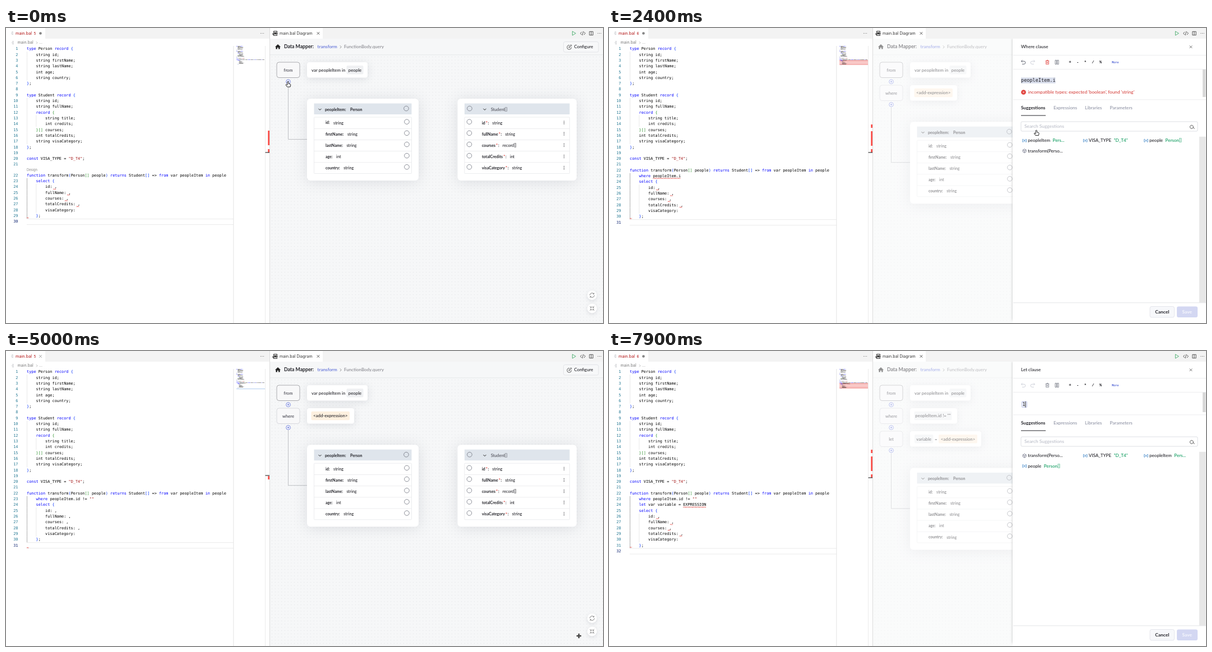
These frames come from a looping animation (1065 px wide and 526 px high, 8 s). An HTML page with a canvas:

```html
<!DOCTYPE html>
<html lang="en">
<head>
<meta charset="utf-8">
<title>Data Mapper</title>
<style>
html, body { margin: 0; width: 100%; height: 100%; overflow: hidden; background: #fff; }
canvas { display: block; width: 1065px; height: 526px; }
</style>
</head>
<body>
<canvas></canvas>
<script>
const W = 1065, H = 526, LOOP = 8000;
const canvas = document.querySelector('canvas'), ctx = canvas.getContext('2d');
const dpr = window.devicePixelRatio || 1;
canvas.width = W * dpr;
canvas.height = H * dpr;

const UI = 'Lato, sans-serif', SYSTEM = 'Inter, sans-serif';
const CODE = '"DejaVu Sans Mono", monospace', SLAB = '"Liberation Mono", monospace';
const INK = '#222228', GREY = '#8d91a3', BLUE = '#5567d5', RED = '#e0413c', LINE = '#e4e5e8';
const CH = 4.139, ROW = 10.31;

const between = (t, a, b) => t >= a && t < b;
const clamp = (v, a = 0, b = 1) => Math.min(b, Math.max(a, v));
const ease = k => k * k * (3 - 2 * k);

// y is the optical centre of the text; returns the right edge
function text(s, x, y, size, color = INK, weight = 500, font = UI, align = 'left') {
  ctx.font = `${weight} ${size}px ${font}`;
  ctx.textAlign = align;
  ctx.fillStyle = color;
  ctx.fillText(s, x, y + size * 0.33);
  return x + ctx.measureText(s).width;
}
function rect(x, y, w, h, fill) {
  ctx.fillStyle = fill;
  ctx.fillRect(x, y, w, h);
}
function box(x, y, w, h, r, fill, stroke, shadow = 0) {
  ctx.save();
  ctx.beginPath();
  ctx.roundRect(x, y, w, h, r);
  if (shadow) {
    ctx.shadowColor = 'rgba(90,92,110,.17)';
    ctx.shadowBlur = shadow * dpr;
    ctx.shadowOffsetY = 2 * dpr;
  }
  if (fill) { ctx.fillStyle = fill; ctx.fill(); }
  ctx.restore();
  if (stroke) { ctx.strokeStyle = stroke; ctx.lineWidth = 0.7; ctx.stroke(); }
}
function circle(x, y, r, stroke, width = 0.8, fill) {
  ctx.beginPath();
  ctx.arc(x, y, r, 0, 7);
  if (fill) { ctx.fillStyle = fill; ctx.fill(); }
  if (stroke) { ctx.strokeStyle = stroke; ctx.lineWidth = width; ctx.stroke(); }
}
function icon(d, x, y, stroke, width = 0.8, fill) {
  const path = new Path2D(d);
  ctx.save();
  ctx.translate(x, y);
  if (fill) { ctx.fillStyle = fill; ctx.fill(path); }
  if (stroke) { ctx.strokeStyle = stroke; ctx.lineWidth = width; ctx.stroke(path); }
  ctx.restore();
}
const CROSS = 'M-2.3 -2.3 L2.3 2.3 M2.3 -2.3 L-2.3 2.3';
const CHEVRON = 'M-2.5 -1.2 L0 1.3 L2.5 -1.2';
const TRASH = 'M-3.2 -2.4 H3.2 M-1 -2.4 V-3.6 H1 V-2.4 M-2.4 -2.4 V3.6 H2.4 V-2.4 M-.8 -.8 V2 M.8 -.8 V2';
const SPLIT = 'M-3.2 -3.2 H3.2 V3.2 H-3.2 Z M0 -3.2 V3.2';
const UNDO = 'M-1.5 -3.8 L-3.6 -1.8 L-1.5 .2 M-3.6 -1.8 H1.2 A2.6 2.6 0 0 1 1.2 3.4 H-2';
const REDO = 'M1.5 -3.8 L3.6 -1.8 L1.5 .2 M3.6 -1.8 H-1.2 A2.6 2.6 0 0 0 -1.2 3.4 H2';
const HAND = 'M-1.1 .2 Q0 -1.2 1.1 .2 V3.3 L4 4 Q5 4.4 4.8 5.6 L4 9 H-1.4 L-4 5.4 Q-3.6 4.2 -2.4 4.8 L-1.1 6 Z';
const MOVE = 'M0 -4.6 L1.8 -2.6 H.7 V-.7 H2.6 V-1.8 L4.6 0 L2.6 1.8 V.7 H.7 V2.6 H1.8 L0 4.6 L-1.8 2.6 H-.7 V.7 H-2.6 V1.8 L-4.6 0 L-2.6 -1.8 V-.7 H-.7 V-2.6 H-1.8 Z';
function dots(x, y, dx, dy, color = INK, r = 0.65) {
  for (let i = -1; i < 2; i++) circle(x + i * dx, y + i * dy, r, null, 0, color);
}

// ---- state -------------------------------------------------------------
const CLICKS = [100, 800, 1900, 2650, 3450, 4600, 5450, 6050, 6650, 7350];
const MOUSE = [
  [0, 503, 96], [350, 503, 96], [750, 552, 103], [1100, 552, 103], [1700, 758, 186], [2350, 758, 186],
  [2650, 814, 142], [2850, 814, 142], [3150, 850, 279], [4200, 850, 279], [4600, 1022, 508], [5050, 1022, 508],
  [5420, 503, 136], [5700, 503, 136], [6000, 545, 154], [6250, 545, 154], [6500, 582, 157], [6600, 582, 157],
  [6680, 615, 157], [6950, 615, 157], [7300, 791, 96], [LOOP, 791, 96]
];
function mouseAt(t) {
  const i = MOUSE.findIndex(p => p[0] > t);
  const [t0, x0, y0] = MOUSE[i - 1], [t1, x1, y1] = MOUSE[i];
  const k = ease((t - t0) / (t1 - t0));
  return [x0 + (x1 - x0) * k, y0 + (y1 - y0) * k];
}
function stateAt(t) {
  const person = 'peopleItem' + '.id'.slice(0, clamp(Math.floor((t - 2200) / 100), 0, 3));
  const isLet = t >= 6250;
  const opened = isLet ? 6950 : 1300;
  return {
    t, isLet, person,
    clauses: isLet ? 2 : t >= 1200 ? 1 : 0,
    whereCode: t < 2100 ? 'EXPRESSION' : t < 4200 ? person : 'peopleItem.id != ""',
    errors: t < 1200 || between(t, 2200, 4200) || between(t, 5300, 6250) || t >= 6450,
    problems: between(t, 1200, 4200) || isLet ? 6 : 5,
    saved: between(t, 4850, 6900),
    menu: between(t, 300, 1100) || between(t, 5650, 6250),
    panel: between(t, 1300, 4800) || t >= 6950 ? ease(clamp((t - opened) / 200)) : 0
  };
}

// ---- code editor -------------------------------------------------------
const TYPES = `type Person record {
    string id;
    string firstName;
    string lastName;
    int age;
    string country;
};

type Student record {
    string id;
    string fullName;
    record {
        string title;
        int credits;
    }[] courses;
    int totalCredits;
    string visaCategory;
};

const VISA_TYPE = "D_T4";

function transform(Person[] people) returns Student[] => from var peopleItem in people`.split('\n');
const SELECT = ['    select {', ...['id: ,', 'fullName: ,', 'courses: ,', 'totalCredits: ,', 'visaCategory:'].map(s => '        ' + s), '    };', ''];
const KEYWORDS = new Set('type record const function returns from in where let select'.split(' '));
const BRACKETS = ['#0431fa', '#319331', '#7b3814'];

function squiggle(x, w, y) {
  ctx.beginPath();
  ctx.moveTo(x, y);
  for (let i = 1; i * 1.2 <= w; i++) ctx.lineTo(x + i * 1.2, y + (i % 2 ? -1.1 : 0));
  ctx.strokeStyle = RED;
  ctx.lineWidth = 0.9;
  ctx.stroke();
}
function drawEditor(s) {
  rect(0, 0, 470, H, '#fff');
  rect(70, 0, 400, 19, '#f3f3f3');
  for (const [x, y] of [[9, 7], [10, 24]]) icon('M1 0 H4 M0 2.2 H4 M1 4.4 H4', x, y, '#9aa0a6', 0.6);
  text('main.bal', 17, 9.5, 7.3, '#b01011', 400, SYSTEM);
  text(s.problems, 49.5, 9.5, 6.6, '#b01011', 400, SYSTEM);
  if (s.saved) icon(CROSS, 61.5, 9.5, '#777', 0.7);
  else circle(61.5, 9.5, 2.3, null, 0, '#858585');
  dots(457, 9.5, 2.6, 0, '#444', 0.5);
  text('main.bal', 20.5, 26, 7.1, '#777', 400, SYSTEM);
  icon('M-1 -2 L1 0 L-1 2', 55, 26.3, '#888', 0.6);
  text('...', 59, 26, 7, '#777', 400, SYSTEM);

  const lines = [...TYPES];
  if (s.clauses > 0) lines.push('    where ' + s.whereCode);
  if (s.clauses > 1) lines.push('    let var variable = EXPRESSION');
  lines.push(...SELECT);
  const lens = s.clauses === 0 ? 9 : 0;
  const lineY = i => 37 + ROW * i + (i > 20 ? lens : 0);
  const last = lines.length - 1, lastY = lineY(last);
  if (lens) text('Design', 37, 253, 5.8, '#888', 400, SYSTEM);

  rect(37, lastY - 5, 369, 0.8, '#e6e6e6');
  rect(37, lastY + 5, 369, 0.8, '#e6e6e6');
  let depth = 0;
  lines.forEach((line, i) => {
    const y = lineY(i), mapY = 32 + i * 1.146;
    text(i + 1, 21.5, y, 6.9, i === last ? '#0b216f' : '#237893', 400, CODE, 'right');
    const indent = line.search(/\S/);
    for (let c = 0; c < indent; c += 4)
      rect(37 + c * CH, y - ROW / 2, 0.7, ROW, c === 0 && i > 21 ? '#8f8f8f' : '#dedede');
    if (s.errors && s.clauses && i > 21 && i < last) rect(411, mapY - 0.2, 51, 0.9, '#f4a9a7');
    for (const m of line.matchAll(/"[^"]*"|\w+|[{}()[\]]|[^\s\w"{}()[\]]+/g)) {
      const token = m[0];
      let color = '#000';
      if (token[0] === '"') color = '#a31515';
      else if (KEYWORDS.has(token)) color = '#0000ff';
      else if ('{(['.includes(token)) color = BRACKETS[depth++];
      else if ('})]'.includes(token)) color = BRACKETS[--depth];
      text(token, 37 + m.index * CH, y, 6.875, color, 400, CODE);
      ctx.globalAlpha = 0.5;
      rect(411 + m.index * 0.58, mapY, token.length * 0.58, 0.8, color);
      ctx.globalAlpha = 1;
    }
    if (!s.errors) return;
    if (line.endsWith(': ,')) squiggle(37 + (line.length - 1.6) * CH, 5, y + 4.8);
    const bad = line.match(/EXPRESSION|peopleItem(\.\w*)?$/);
    if (bad && i > 21) squiggle(37 + bad.index * CH, bad[0].length * CH, y + 4.8);
  });
  squiggle(37, 4.5, s.errors ? lastY - 6 : lastY + 5);
  if (!s.errors) rect(411, 67, 51, 0.9, '#a9c8ee');

  rect(405.5, 32, 0.8, H, '#dcdcdc');
  rect(462, 32, 0.7, H, '#e2e2e2');
  const shift = s.clauses === 2 ? 4 : 0;
  const ruler = (y, h) => rect(467.3, y + shift, 2.7, h, '#fb4b46');
  if (s.errors) {
    if (s.clauses) ruler(172, 6);
    ruler(s.clauses ? 184 : 183, 26);
    ruler(216, 6);
  } else ruler(223, 6);
  rect(462.5, 221.3 + shift, 7.5, 1.3, '#444');
  rect(470, 0, 0.8, H, '#dcdcdc');
}

// ---- diagram -----------------------------------------------------------
const dotGrid = new Path2D();
for (let y = 51; y < 521; y += 5.73)
  for (let x = 474; x < W; x += 5.73) dotGrid.rect(x, y, 1, 1);

function token(s, x, y, w, warm) {
  box(x, y - 8, w, 15.5, 2, warm ? '#fdf0df' : '#f0f1f3');
  text(s, x + w / 2, y, 7.8, INK, 500, UI, 'center');
}
function clause(name, y, width) {
  box(483, y - 14, 41, 27.5, 4, '#f8f8f9', name === 'from' ? '#8c8c90' : '#cbccd2');
  text(name, 503.5, y, 7.6, '#40404b', 500, UI, 'center');
  box(537, y - 14, width, 27.5, 4, '#fff', null, 14);
}
function drawDiagram(s) {
  rect(471, 0, W, 19, '#f3f3f3');
  rect(471, 0, 94, 19, '#fff');
  icon('M-3 -3.8 H3 V-1.4 H-3 Z M-3 1.4 H3 V3.8 H-3 Z M0 -1.4 V1.4 M-4.5 0 H4.5 M-4.5 0 V2.5 H-3', 480.5, 9.5, '#111', 0.9);
  text('main.bal Diagram', 488, 9.5, 7.15, '#333', 400, SYSTEM);
  icon(CROSS, 557, 9.5, '#333', 0.8);
  icon('M-2.6 -3.6 L3.4 0 L-2.6 3.6 Z', 1013, 9.5, '#2fa35a', 0.8);
  icon('M-2 -2.6 L-4.4 0 L-2 2.6 M2 -2.6 L4.4 0 L2 2.6 M.9 -3.6 L-.9 3.6', 1029, 9.5, '#333', 0.8);
  icon(SPLIT, 1044, 9.5, '#333', 0.8);
  dots(1058.5, 9.5, 2.6, 0, '#444', 0.55);

  rect(471, 19, W, H, '#f6f7f8');
  ctx.fillStyle = '#dfe0e3';
  ctx.fill(dotGrid);
  rect(471, 47.5, W, 0.8, '#e2e3e6');
  icon('M-5 .3 L0 -4.5 L5 .3 H3.6 V4 H1 V1.2 H-1 V4 H-3.6 V.3 Z', 485, 33.5, null, 0, '#222');
  text('Data Mapper:', 496, 33.5, 8.7, INK, 700);
  text('transform', 555.5, 33.5, 8.2, BLUE);
  icon('M-1.2 -2.4 L1.2 0 L-1.2 2.4', 597, 33.8, '#777', 0.8);
  text('FunctionBody.query', 603, 33.5, 8, '#85858c');

  const shift = s.menu ? 6 : 0;
  box(994.5 + shift, 24.5, 62.5, 18.5, 3, '#f7f8f9', '#dcdde1');
  icon('M0 -3.4 A3.8 3.8 0 1 0 3.6 .4 M-1 1 L-.5 -.8 L3 -4.2 L4.2 -3 L.8 .5 Z', 1005 + shift, 34, '#333', 0.8);
  text('Configure', 1013.5 + shift, 33.8, 7.9);
  for (const y of [476.5, 500]) box(1037 + shift, y - 8.5 + shift, 17, 17, 8.5, '#fff', null, 6);
  icon('M-4 0 A4 4 0 0 1 3.2 -2.4 M3.4 -4.2 V-2.2 H1.4 M4 0 A4 4 0 0 1 -3.2 2.4 M-3.4 4.2 V2.2 H-1.4', 1045.5 + shift, 476.5 + shift, '#777', 0.9);
  icon('M-4 -4 L-1.4 -1.4 M-3.6 -1.3 H-1.3 V-3.6 M4 -4 L1.4 -1.4 M3.6 -1.3 H1.3 V-3.6 M-4 4 L-1.4 1.4 M-3.6 1.3 H-1.3 V3.6 M4 4 L1.4 1.4 M3.6 1.3 H1.3 V3.6', 1045.5 + shift, 500 + shift, '#777', 0.8);

  const dy = s.clauses * 41.2;
  icon(`M503.5 ${100 + dy} V${198.5 + dy} H537`, 0, 0, '#b2b3b8', 0.8);
  clause('from', 75, 108);
  text('var peopleItem in', 545, 75, 7.9);
  token('people', 607.5, 75, 30);
  if (s.clauses > 0) {
    const done = s.t >= 5200;
    clause('where', 116, 84);
    token(done ? 'peopleItem.id != ""' : '<add-expression>', 544.5, 115.7, done ? 67 : 68.5, !done);
  }
  if (s.clauses > 1) {
    clause('let', 157, 127);
    token('variable', 545, 157, 33.5);
    text('=', 581, 157, 7.8);
    token('<add-expression>', 588, 157, 69, true);
    if (between(s.t, 6400, 6950)) icon(TRASH, 675, 156.5, RED, 0.8);
  }
  for (let i = 0; i <= s.clauses; i++) {
    circle(503.5, 95.7 + i * 40.8, 3.8, BLUE, 0.8, '#fff');
    icon('M-2 0 H2 M0 -2 V2', 503.5, 95.7 + i * 40.8, BLUE, 0.8);
  }
  ctx.save();
  ctx.translate(0, dy);
  drawRecords();
  ctx.restore();
}
function recordCard(x, w, fields, drawField) {
  box(x, 126, w, 146, 6, '#fff', null, 24);
  const left = x + 12.5, inner = w - 25;
  rect(left, 134.5, inner, 19.5, '#dfe5ec');
  box(left, 159, inner, 100.5, 1, null, LINE);
  fields.forEach((field, i) => {
    if (i) rect(left, 159 + i * 20.1, inner, 0.7, LINE);
    drawField(field.split(' '), 169.2 + i * 20.15);
  });
}
function drawRecords() {
  const ring = (x, y) => circle(x, y, 4.3, '#70747f', 0.8, '#fff');
  recordCard(537, 199, ['id string', 'firstName string', 'lastName string', 'age int', 'country string'], ([name, type], y) => {
    const end = text(name + ':', 570, y, 6.95, INK, 700);
    text(type, end + 6.5, y, 7.3);
    ring(715, y - 2);
  });
  icon(CHEVRON, 560, 145, '#222', 1);
  text('peopleItem:', 569, 145.5, 7.1, INK, 700);
  text('Person', 614, 145.5, 7, INK, 700);
  circle(714, 143.5, 4.3, '#70747f', 0.8);
  recordCard(805.5, 212.5, ['id string', 'fullName string', 'courses record[]', 'totalCredits int', 'visaCategory string'], ([name, type], y) => {
    let end = text(name, 849, y, 7.1, INK, 700);
    end = text('*', end + 1, y, 8, RED, 700);
    end = text(':', end + 0.5, y, 7.1, INK, 700);
    text(type, end + 6, y, 7.2);
    ring(826.5, y - 2);
    dots(995.5, y - 0.7, 0, 2.4);
  });
  circle(827, 143.5, 4.3, '#70747f', 0.8);
  icon(CHEVRON, 854, 145, '#222', 1);
  text('Student[]', 865, 145.5, 7.2, '#4c4c55');
}
function drawMenu(s) {
  const y = 90 + s.clauses * 41, hovered = s.clauses ? (s.t > 5900 ? 1 : -1) : (s.t > 600 ? 0 : -1);
  ctx.save();
  ctx.shadowColor = 'rgba(0,0,0,.35)';
  ctx.shadowBlur = 7 * dpr;
  ctx.shadowOffsetY = 2 * dpr;
  rect(511.5, y, 81.5, 86, '#fff');
  ctx.restore();
  ['where', 'let', 'limit', 'order by', 'join', 'outer join'].forEach((name, i) => {
    if (i === hovered) rect(511.5, y + 4.5 + i * 12.8, 81.5, 12.8, '#f1f1f1');
    text(`Add ${name} clause`, 520, y + 11 + i * 12.8, 7);
  });
}

// ---- side panel --------------------------------------------------------
const OPERATORS = [
  ['Arithmetic', 'Es + Ex', 'Es - Ex', 'Es * Ex', 'Es / Ex', 'Es % Ex'],
  ['Equality', 'Es == Ex', 'Es != Ex'],
  ['Relational', 'Es < Ex', 'Es > Ex', 'Es <= Ex', 'Es >= Ex'],
  ['Binary Bitwise', 'Es & Ex', 'Es | Ex', 'Es ^ Ex'],
  ['Unary', '+ Es', '- Es', '~ Es', '! Es'],
  ['Logical', 'Es && Ex', 'Es || Ex']
];
const VARIABLES = { item: ['peopleItem', 'Pers...'], visa: ['VISA_TYPE', '"D_T4"'], people: ['people', 'Person[]'], fn: ['transform(Perso...'] };

function drawExpression(s) {
  const { t } = s, x = 735, y = 93.5, size = 8.52;
  const highlight = (col, n) => rect(x + col * 5.13, 88.3, n * 5.13, 10.4, '#d9deec');
  let value = '<add-expression>';
  if (!s.isLet) {
    if (t >= 2000) value = t < 3600 ? s.person : 'peopleItem.id != ' + (t < 4100 ? 'Ex' : t < 4200 ? '"' : '""');
    if (t < 3600) highlight(0, value.length);
    else if (t < 4100) highlight(17, 2);
  } else if (t < 7500) highlight(0, value.length);
  else {
    value = t < 7850 ? '' : '1';
    if (value) box(736.5, 90, 9, 10.5, 1, '#eef1fb', '#a9b2e2');
    rect(value ? 742.5 : 737, 90, 0.9, 10.5, '#111');
  }
  text(value, value === '1' ? 737.3 : x, value === '1' ? 95 : y, size, INK, 400, CODE);
}
function drawOperators(s, top) {
  ctx.save();
  ctx.beginPath();
  ctx.rect(721, top - 8, 345, 489 - top + 8);
  ctx.clip();
  const hover = between(s.t, 3100, 3650);
  let y = top;
  for (const [title, ...ops] of OPERATORS) {
    text(title, 735, y, 7.8, INK, 700);
    y += 15.4;
    ops.forEach((op, i) => {
      const x = 735 + i % 3 * 110.2, rowY = y + Math.floor(i / 3) * 18.3;
      if (hover && op === 'Es != Ex') rect(839, rowY - 7, 47.5, 14, '#f0f1f4');
      text(op, x, rowY, 7.3, INK, 700, SLAB);
    });
    y += Math.floor((ops.length - 1) / 3) * 18.3 + 11.7;
    rect(735, y, 309, 0.7, LINE);
    y += 20.1;
  }
  if (hover) {
    box(839, 294, 41.5, 15, 2, '#fff', '#d9dae0', 4);
    text('Not Equal', 859.7, 301.5, 7.4, '#666b78', 500, UI, 'center');
  }
  ctx.restore();
  rect(1059, top - 5, 5.5, 76, '#c4c4c4');
}
function drawSuggestions(s, y) {
  const order = s.isLet ? ['fn', 'visa', 'item', 'people'] : ['item', 'visa', 'people', 'fn'];
  rect(1053, y - 7, 11.5, 490 - y + 7, '#e7e7e7');
  if (between(s.t, 1600, 2400)) rect(729, y - 7.2, 93, 14.2, '#eef1fb');
  order.forEach((key, i) => {
    const x = 738 + i % 3 * 108.4, rowY = y + Math.floor(i / 3) * 18.3;
    const [name, type] = VARIABLES[key];
    if (type) icon('M-2 -2.4 H-3.2 V2.4 H-2 M2 -2.4 H3.2 V2.4 H2 M-1.6 1.2 L1.6 -1.2 M-1.4 -1 H.2 M-.2 1 H1.4', x + 3.2, rowY, '#2b79c2', 0.8);
    else icon('M0 -3.4 L2.9 -1.7 V1.7 L0 3.4 L-2.9 1.7 V-1.7 Z M-2.9 -1.7 L0 0 L2.9 -1.7 M0 0 V3.4', x + 3.2, rowY, '#555a70', 0.7);
    const end = text(name, x + 9.3, rowY, 8);
    if (type) text(type, end + 4.5, rowY, 8, '#0b9a5c');
  });
}
function drawPanel(s) {
  ctx.save();
  ctx.beginPath();
  ctx.rect(471, 19, W, H);
  ctx.clip();
  ctx.globalAlpha = 0.5 * s.panel;
  rect(471, 19, W, H, '#fff');
  ctx.globalAlpha = 1;
  ctx.translate((1 - s.panel) * 345, 0);
  ctx.save();
  ctx.shadowColor = 'rgba(0,0,0,.25)';
  ctx.shadowBlur = 4 * dpr;
  rect(720, 19, 345, 502, '#fff');
  ctx.restore();
  rect(720, 19, 345, H, '#fff');

  const { t } = s;
  const error = between(t, 2150, 3700);
  const offset = error ? 16 : t >= 7500 ? 2 : 0;
  const expressions = between(t, 2700, 4800);
  const edited = between(t, 2000, 4800);
  text(s.isLet ? 'Let clause' : 'Where clause', 735, 33.5, 8.1);
  icon(CROSS, 1038, 33.7, '#555', 0.8);
  rect(721, 48, 344, 0.7, LINE);
  icon(UNDO, 739, 61, edited ? '#555a66' : '#c9ccd6', 0.9);
  icon(REDO, 756, 61, '#c9ccd6', 0.9);
  icon(TRASH, 782, 61, edited ? RED : '#7b7f8c', 0.8);
  icon('M-3 -3.6 H-.7 V3.6 H-3 Z M.7 -3.6 H3 V3.6 H.7 Z', 799, 61, '#666a76', 0.8);
  ['+', '-', '*', '/', '%'].forEach((op, i) => text(op, 822.5 + i * 13.6, 61, 7.2, INK, 700, SLAB, 'center'));
  text('More', 897, 61, 5.2, BLUE, 700, SLAB);
  rect(721, 73.3, 344, 0.7, LINE);
  rect(1059, 74, 5.5, 33 + offset, '#d9d9d9');
  drawExpression(s);
  if (error) {
    circle(739.5, 114.5, 4.3, null, 0, RED);
    icon('M-1.5 -1.5 L1.5 1.5 M1.5 -1.5 L-1.5 1.5', 739.5, 114.5, '#fff', 0.8);
    text("incompatible types: expected 'boolean', found 'string'", 747.5, 114.5, 8.2, '#d6433f');
  }
  rect(721, 111.5 + offset, 344, 0.7, LINE);
  [['Suggestions', 735, 44], ['Expressions', 793, 42], ['Libraries', 849], ['Parameters', 893.5]].forEach(([name, x, w], i) => {
    const active = i === +expressions;
    text(name, x, 126 + offset, 8.1, active ? INK : GREY, active ? 700 : 500);
    if (active) rect(x, 139.5 + offset, w, 1, INK);
  });
  box(735, 151 + offset, 315, 17, 2, '#fff', '#cfd1d9');
  text(expressions ? 'Search Expression' : 'Search Suggestions', 741, 159.5 + offset, 8.4, '#b3b6c2', 400);
  icon('M1.9 .9 A3 3 0 1 1 1.9 .8 M1.2 1.4 L4.2 4.2', 1040.5, 159.5 + offset, '#444', 0.9);
  if (expressions) drawOperators(s, 183 + offset);
  else drawSuggestions(s, 184.8 + offset);

  rect(721, 489.5, 344, 37, '#fff');
  rect(721, 489.5, 344, 0.8, '#dcdde2');
  box(965, 496.5, 43.5, 19.5, 3, '#f7f8fb', '#dcdde5');
  text('Cancel', 986.7, 506.3, 8.4, INK, 700, UI, 'center');
  const canSave = between(t, 4250, 4800);
  box(1013, 496.5, 37, 19.5, 3, canSave ? BLUE : '#d3d7f2');
  text('Save', 1031.3, 506.3, 8.4, canSave ? '#fff' : '#f6f7fd', 700, UI, 'center');
  ctx.restore();
}

function drawPointer(t) {
  const [x, y] = mouseAt(t);
  const click = CLICKS.find(c => between(t, c, c + 250));
  if (click !== undefined) circle(x, y, 17 * clamp((t - click + 30) / 120), '#111', 1.8);
  if (t >= 7850) return;
  if (t >= 7250) icon('M-1.5 -4.5 H1.5 M0 -4.5 V4.5 M-1.5 4.5 H1.5', x, y, '#222', 0.9);
  else if (between(t, 4800, 5400) || between(t, 6350, 6640)) icon(MOVE, x, y, '#fff', 1.2), icon(MOVE, x, y, null, 0, '#111');
  else icon(HAND, x, y, '#111', 0.9, '#fff');
}

function draw(t) {
  const s = stateAt(t);
  ctx.setTransform(dpr, 0, 0, dpr, 0, 0);
  drawDiagram(s);
  drawEditor(s);
  if (s.panel) drawPanel(s);
  if (s.menu) drawMenu(s);
  drawPointer(t);
}
const start = performance.now();
(function tick() {
  draw(Math.max(0, performance.now() - start) % LOOP);
  requestAnimationFrame(tick);
})();
</script>
</body>
</html>
```
